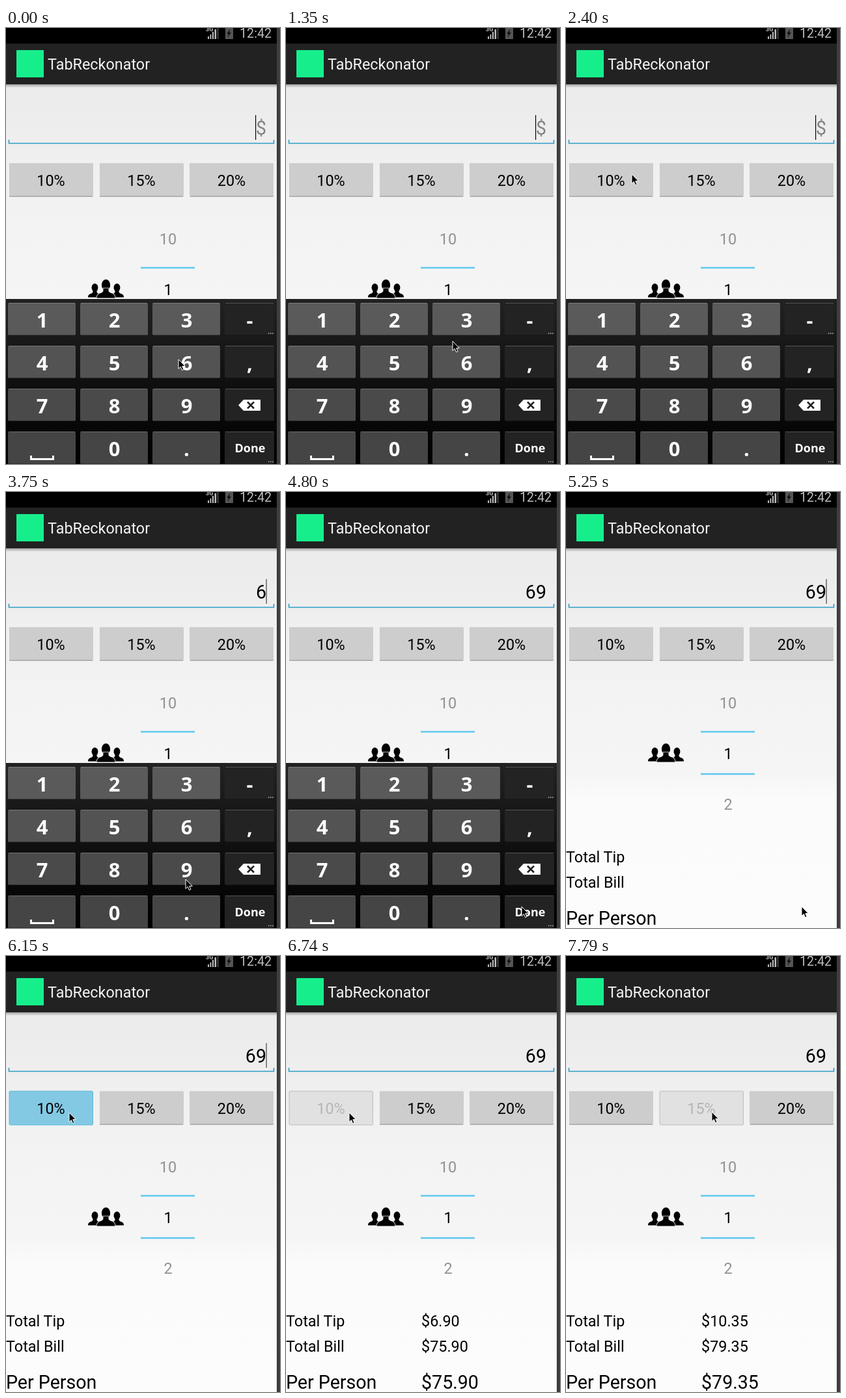
These frames come from a looping animation (421x671 px, 8 s). An HTML page:

```html
<!DOCTYPE html>
<html lang="en">
<head>
<meta charset="utf-8">
<title>Bill splitting demo</title>
<style>
  html, body { margin: 0; width: 100%; height: 100%; overflow: hidden; background: #3d3d3d; }
  svg { display: block; width: 421px; height: 671px; }
  text { font-family: Roboto, "Noto Sans", sans-serif; font-size: 23.4px; }
  .big { font-size: 28.6px; }
  .mid { text-anchor: middle; }
  .end { text-anchor: end; }
  .faint { fill: #929292; }
  .keys text { font: bold 31px "Noto Sans", "Open Sans", sans-serif; fill: #fff; text-anchor: middle; }
  .keys .small { font-size: 18px; }
</style>
</head>
<body>
<svg viewBox="0 0 421 671">
  <defs>
    <linearGradient id="page" x2="0" y2="1">
      <stop offset="0" stop-color="#ebebeb"/>
      <stop offset=".36" stop-color="#f3f3f3"/>
      <stop offset=".59" stop-color="#f5f5f5"/>
      <stop offset=".66" stop-color="#fbfbfb"/>
      <stop offset="1" stop-color="#fcfcfc"/>
    </linearGradient>
    <linearGradient id="shade" x2="0" y2="1">
      <stop offset="0" stop-color="#000" stop-opacity=".35"/>
      <stop offset="1" stop-color="#000" stop-opacity="0"/>
    </linearGradient>
    <linearGradient id="board" x2="0" y2="1">
      <stop offset="0" stop-color="#222"/>
      <stop offset=".6" stop-color="#0c0c0c"/>
      <stop offset="1" stop-color="#000"/>
    </linearGradient>
    <g id="person">
      <ellipse cy="-18" rx="6.6" ry="8.5"/>
      <path d="M-4-13H4V-9Q5-6 10-5Q14-3 14 2H-14Q-14-3-10-5Q-5-6-4-9Z"/>
    </g>
  </defs>

  <rect width="421" height="671" fill="#3d3d3d"/>
  <rect y="86" width="416" height="585" fill="url(#page)"/>
  <rect y="86" width="416" height="6" fill="url(#shade)"/>
  <rect width="416" height="24" fill="#000"/>
  <rect y="24" width="416" height="62" fill="#222"/>
  <rect y="85" width="416" height="1.5" fill="#111"/>

  <!-- status bar -->
  <text x="307" y="5" fill="#bbb" style="font-size:9px;font-weight:bold">3G</text>
  <path d="M310 17v-4h2v4zM313.500 17v-7h2v7zM317 17v-11h2v11zM320.500 17V2h2.500v15z" fill="#bdbdbd"/>
  <path d="M324 0h3v17h-3z" fill="#333"/>
  <path d="M337 0h12v17h-12z" fill="#555"/>
  <path d="M345 1l-6 8h3l-2 6 6-8h-3z" fill="#111"/>
  <text x="359" y="15" fill="#bdbdbd" style="font-size:19.700px">12:42</text>

  <!-- title bar -->
  <rect x="16" y="34" width="42" height="42" fill="#16ee8c"/>
  <text x="64" y="64" fill="#f3f3f3">TabReckonator</text>

  <!-- amount field -->
  <path d="M4.500 172v5.500h407V172" fill="none" stroke="#2b9cc8" stroke-width="1.600"/>
  <text id="hint" class="big end" x="400" y="164" fill="#858585">$</text>
  <text id="one" class="big end" x="400" y="164">6</text>
  <text id="two" class="big end" x="400" y="164">69</text>
  <g id="caret">
    <rect id="caretHint" x="383" y="134" width="1.200" height="38"/>
    <rect id="caretText" x="399.500" y="134" width="1.200" height="38" fill="#444"/>
  </g>

  <g id="buttons"></g>

  <!-- party size -->
  <use href="#person" transform="translate(136.500 413) scale(.75)"/>
  <use href="#person" transform="translate(170.500 413) scale(.75)"/>
  <use href="#person" transform="translate(153.500 413.500)" stroke="#f4f4f4" stroke-width="1.500" paint-order="stroke"/>
  <path d="M207 369h83M207 434h83" stroke="#5dc8ee" stroke-width="2.400"/>
  <text class="mid faint" x="249" y="333">10</text>
  <text class="mid" x="249" y="411">1</text>
  <text class="mid faint" x="249" y="489">2</text>

  <!-- totals -->
  <text x="0" y="570">Total Tip</text>
  <text x="0" y="609">Total Bill</text>
  <text class="big" x="0" y="666">Per Person</text>
  <g id="totals10"></g>
  <g id="totals15"></g>

  <g id="keyboard" class="keys"></g>

  <path id="pointer" d="M0 0V14.500L3.300 11.400 5.600 16.700 8 15.700 5.800 10.600H10.300Z"
        stroke="#fff" stroke-width="1"/>
</svg>

<script>
const LOOP = 8000;
const byId = id => document.getElementById(id);
const sheet = document.head.appendChild(document.createElement('style'));

// Emits stepped keyframes; a small negative delay keeps cuts ahead of their mark.
function steps(id, prop, list) {
  const frames = list.map(([ms, value]) => `${ms / LOOP * 100}%{${prop}:${value}}`).join('');
  sheet.textContent += `@keyframes ${id}{${frames}}
    #${id}{animation:${id} ${LOOP}ms step-end -8ms infinite}`;
}

// Shows an element only within the given [from, to] spans.
function show(id, ...spans) {
  const list = spans[0][0] > 0 ? [[0, 0]] : [];
  for (const [from, to] of spans) {
    list.push([from, 1]);
    if (to < LOOP) list.push([to, 0]);
  }
  steps(id, 'opacity', list);
}

function button(x, label) {
  const rect = (fill, extra = '') =>
    `<rect x="${x}" y="208" width="128.500" height="52" rx="1.500" fill="${fill}" ${extra}/>`;
  const text = color => `<text class="mid" x="${x + 64}" y="243" fill="${color}">${label}%</text>`;
  return `${rect('#a6a6a6')}
    <rect x="${x}" y="208" width="128.500" height="50.500" rx="1.500" fill="#cdcdcd"/>${text('#000')}
    <g id="off${label}">${rect('#e1e1e1', 'stroke="#bdbdbd"')}${text('#b5b5b5')}</g>
    <g id="down${label}">${rect('#83c9e4', 'stroke="#5cb9dc"')}${text('#000')}</g>`;
}

function totals(tip, bill) {
  return `<text x="208" y="570">${tip}</text><text x="208" y="609">${bill}</text>
    <text class="big" x="208" y="666">${bill}</text>`;
}

function keyRect(col, row, fill, id = '') {
  const x = 3 + 111 * col, y = 423 + 66 * row, w = col < 3 ? 104 : 76;
  return `<g ${id && `id="${id}"`}>
    <rect x="${x}" y="${y}" width="${w}" height="50" rx="2" fill="${fill}"/>
    <path d="M${x + 1} ${y + .5}h${w - 2}" stroke="#fff" stroke-opacity=".22"/>
    <path d="M${x + 1} ${y + 49.5}h${w - 2}" stroke="#000" stroke-opacity=".35"/></g>`;
}

function keyboard() {
  const rows = ['123-', '456,', '789<', '_0.D'];
  const shades = ['#5a5a5a', '#535353', '#4a4a4a', '#454545'];
  const pressed = { 6: 'down6', 9: 'down9', D: 'downDone' };
  const glyphs = {
    _: '<path d="M38.500 658v5.500h34V658" fill="none" stroke="#fff" stroke-width="3"/>',
    '<': `<path d="M357 580.500l8-8.500h26v17h-26z" fill="#fff"/>
      <path d="M371 575.500l10 10m0-10l-10 10" stroke="#222" stroke-width="2.500"/>`,
    D: '<text class="small" x="375" y="653">Done</text>'
  };
  let out = '<rect y="417" width="416" height="254" fill="url(#board)"/>';
  rows.forEach((row, r) => [...row].forEach((key, c) => {
    out += keyRect(c, r, c < 3 ? shades[r] : '#232323');
    if (pressed[key]) out += keyRect(c, r, '#2a8db3', pressed[key]);
    out += glyphs[key] ||
      `<text x="${c < 3 ? 55.5 + 111 * c : 374.5}" y="${461 + 66 * r}">${key}</text>`;
  }));
  const dots = y => `M403 ${y}h1.500m1.500 0h1.500m1.500 0h1.500`;
  return out + `<path d="${dots(470)}${dots(667.5)}" stroke="#bbb" stroke-width="1.500"/>`;
}

byId('buttons').innerHTML = button(5, 10) + button(144, 15) + button(282.5, 20);
byId('totals10').innerHTML = totals('$6.90', '$75.90');
byId('totals15').innerHTML = totals('$10.35', '$79.35');
byId('keyboard').innerHTML = keyboard();

show('hint', [0, 3600]);
show('caretHint', [0, 3600]);
show('one', [3600, 4200]);
show('two', [4200, LOOP]);
show('caretText', [3600, LOOP]);
show('caret', [0, 450], [1050, 1500], [2100, 2550], [3150, 4800], [5250, 5700], [6150, 6740], [7190, 7640]);

show('down6', [3450, 3600]);
show('down9', [4050, 4200]);
show('downDone', [5100, 5250]);
show('keyboard', [0, 5250]);
show('down10', [6150, 6300]);
show('off10', [6300, 7790]);
show('down15', [7640, 7790]);
show('off15', [7790, LOOP]);
show('totals10', [6300, 7790]);
show('totals15', [7790, LOOP]);
show('down20', [LOOP, LOOP]);
show('off20', [LOOP, LOOP]);

// Pointer stops: time, x, y
steps('pointer', 'transform', [
  [0, 265, 510], [1350, 256, 482], [1500, 218, 405], [1650, 162, 312], [1800, 116, 254],
  [1950, 94, 230], [2100, 101, 225],
  [2550, 112, 244], [2700, 165, 350], [2850, 235, 485], [3000, 270, 562], [3150, 268, 516],
  [3600, 272, 560], [3750, 276, 596],
  [4350, 286, 601], [4500, 318, 616], [4650, 350, 632], [4800, 362, 638],
  [5400, 361, 470], [5550, 326, 330], [5700, 240, 268], [5850, 140, 243], [6000, 97, 241],
  [6890, 132, 240], [7040, 192, 238], [7190, 224, 240]
].map(([ms, x, y]) => [ms, `translate(${x}px,${y}px)`]));
</script>
</body>
</html>
```
